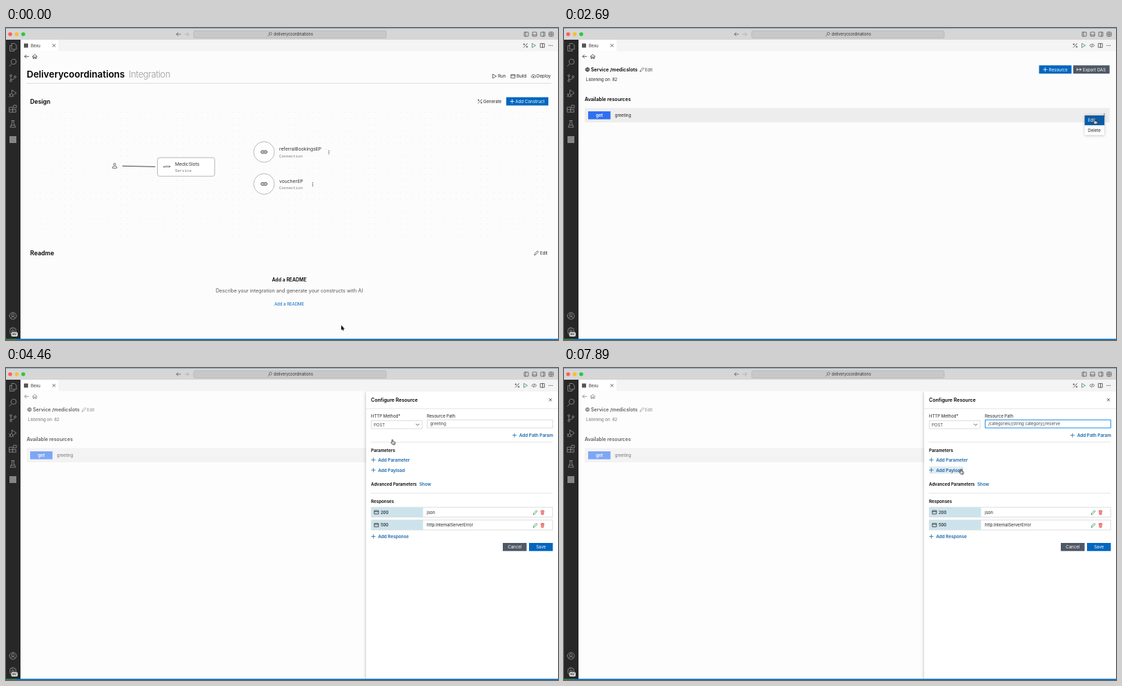
Animation, 800 px wide and 453 px high, one loop 7.99 s. Source, as an HTML page with a canvas:

```html
<!DOCTYPE html>
<html lang="en">
<head>
<meta charset="utf-8">
<title>Service editor</title>
<style>
  html, body { margin: 0; width: 100%; height: 100%; overflow: hidden; background: #fcfcfc; }
  canvas { display: block; width: 100vw; height: 100vh; }
</style>
</head>
<body>
<canvas id="stage"></canvas>
<script>
const W = 800, H = 453, LOOP = 7990, STEP = 650 / 7;
const BLUE = '#0066bf', INK = '#1e1e1e', GREY = '#616161';
const SANS = 'Inter, "Open Sans", sans-serif';
const MONO = '"Liberation Mono", "DejaVu Sans Mono", monospace';
const canvas = document.getElementById('stage');
const ctx = canvas.getContext('2d');
const dpr = window.devicePixelRatio || 1;
canvas.width = W * dpr;
canvas.height = H * dpr;

// y is the middle of the capital letters
function text(s, x, y, size = 6.1, color = INK, weight = 400, align = 'left', family = SANS) {
  ctx.font = `${weight} ${size}px ${family}`;
  ctx.fillStyle = color;
  ctx.textAlign = align;
  ctx.fillText(s, x, y + size * 0.365);
}
const bold = (s, x, y, size, color = '#000') => text(s, x, y, size, color, 600);

function box(x, y, w, h, fill, stroke, r = 0, lw = 0.7) {
  ctx.beginPath();
  ctx.roundRect(x, y, w, h, r);
  if (fill) { ctx.fillStyle = fill; ctx.fill(); }
  if (stroke) { ctx.strokeStyle = stroke; ctx.lineWidth = lw; ctx.stroke(); }
}
function circle(x, y, r, fill, stroke, lw = 0.8) {
  box(x - r, y - r, 2 * r, 2 * r, fill, stroke, r, lw);
}
function shadowBox(x, y, w, h, blur) {
  ctx.save();
  ctx.shadowColor = 'rgba(0,0,0,.28)';
  ctx.shadowBlur = blur * dpr;
  box(x, y, w, h, '#fff');
  ctx.restore();
}
// SVG path drawn around a centre
function icon(d, x, y, color = '#444', lw = 0.8, fill) {
  const p = new Path2D(d);
  ctx.save();
  ctx.translate(x, y);
  ctx.lineWidth = lw;
  ctx.lineJoin = ctx.lineCap = 'round';
  ctx.strokeStyle = color;
  if (fill) { ctx.fillStyle = fill; ctx.fill(p); }
  ctx.stroke(p);
  ctx.restore();
}
const rule = (x1, x2, y, color = '#dcdcdc') => icon(`M${x1} ${y}H${x2}`, 0, 0, color, 0.8);
function kebab(x, y, color = '#333') {
  for (const d of [-2.3, 0, 2.3]) circle(x, y + d, 0.65, color);
}

const ICON = {
  back: 'M3 0H-3M-.6 -2.4L-3 0L-.6 2.4',
  fwd: 'M-3 0H3M.6 -2.4L3 0L.6 2.4',
  home: 'M-3.3 .2L0 -3L3.3 .2M-2.4 -.5V3H-.8V.8H.8V3H2.4V-.5',
  plus: 'M-2.7 0H2.7M0 -2.7V2.7',
  close: 'M-1.8 -1.8L1.8 1.8M1.8 -1.8L-1.8 1.8',
  play: 'M-2.2 -2.8L2.6 0L-2.2 2.8Z',
  split: 'M-2.8 -2.8H2.8V2.8H-2.8ZM0 -2.8V2.8',
  code: 'M-1.5 -2L-3.3 0L-1.5 2M1.5 -2L3.3 0L1.5 2M.5 -2.4L-.5 2.4',
  wand: 'M-2.8 2.8L1.2 -1.2M-2.2 -2.6V-.8M-3.1 -1.7H-1.3M2 1V2.8M1.1 1.9H2.9M2.4 -2.9L1.2 -1.2',
  pencil: 'M-2.8 2.8L-2.2 .8L1.6 -3L3 -1.6L-.8 2.2Z',
  chevron: 'M-2.3 -1.1L0 1.2L2.3 -1.1',
  link: 'M-.7 -2H-2.4A2 2 0 0 0 -2.4 2H-.7M.7 -2H2.4A2 2 0 0 1 2.4 2H.7M-1.9 0H1.9',
  person: 'M-1.5 -2A1.5 1.5 0 1 0 1.5 -2A1.5 1.5 0 1 0 -1.5 -2M-3 3.3V2.3Q-3 .9 -1.5 .9H1.5Q3 .9 3 2.3V3.3Z',
  globe: 'M-2.8 0A2.8 2.8 0 1 0 2.8 0A2.8 2.8 0 1 0 -2.8 0M-2.6 -1H2.6M-2.6 1H2.6M0 -2.8Q-2.6 0 0 2.8Q2.6 0 0 -2.8',
  box: 'M-2.8 -2.4H2.8V2.6H-2.8ZM-2.8 -.8H2.8',
  cloud: 'M-1.8 2H-2A1.6 1.6 0 0 1 -1.9 -1A2 2 0 0 1 1.9 -1.2A1.6 1.6 0 0 1 2 2H1.6M0 2.6V0M-1 1L0 0L1 1',
  bin: 'M-2.4 -2H2.4M-.9 -2.9H.9M-1.8 -2L-1.5 2.9H1.5L1.8 -2M-.5 -.7V1.7M.5 -.7V1.7',
  export: 'M-3 -1.6V1.6M-2.6 0H3M1.2 -1.8L3 0L1.2 1.8',
  lens: 'M-1 1L-3 3M-1.2 -.8A2 2 0 1 0 2.8 -.8A2 2 0 1 0 -1.2 -.8',
  files: 'M-1.5 -5.5H2.6L5 -3V3H-1.5ZM-1.5 -2.5H-4.5V5.5H2V3',
  search: 'M-1.8 1.8L-5 5.2M-2.6 -1.4A3.7 3.7 0 1 0 4.8 -1.4A3.7 3.7 0 1 0 -2.6 -1.4',
  branch: 'M-3 -2V2.5M-4.3 -3.5A1.4 1.4 0 1 0 -1.5 -3.5A1.4 1.4 0 1 0 -4.3 -3.5M-4.3 4A1.4 1.4 0 1 0 -1.5 4A1.4 1.4 0 1 0 -4.3 4M1.8 -1.8A1.4 1.4 0 1 0 4.6 -1.8A1.4 1.4 0 1 0 1.8 -1.8M3.2 -.4Q3 2 -2.6 2.4',
  debug: 'M-1.5 -1V-5L5 -.5L.6 2.5M-4.2 2.6A2 2.4 0 1 0 -.2 2.6A2 2.4 0 1 0 -4.2 2.6M-5.4 1L-4 1.8M-5.4 4.6L-4 3.8M1 4.6L-.4 3.8',
  blocks: 'M-5 -2.2H-.4V5H-5ZM-5 1.4H4.4V5H-.4M1.2 -5H5V-1.2H1.2Z',
  flask: 'M-2 -5H2M-1.2 -5V-1.5L-4 4.6H4L1.2 -1.5V-5M-2.6 1.6H2.6',
  user: 'M-5 0A5 5 0 1 0 5 0A5 5 0 1 0 -5 0M-1.9 -1.3A1.9 1.9 0 1 0 1.9 -1.3A1.9 1.9 0 1 0 -1.9 -1.3M-3.4 3.6Q-2.8 1 0 1Q2.8 1 3.4 3.6',
  gear: 'M-1.6 0A1.6 1.6 0 1 0 1.6 0A1.6 1.6 0 1 0 -1.6 0M-1 -5H1L1.4 -3.5L3.2 -4.2L4.4 -2.8L3.6 -1L5 0L3.6 1.4L4 3.2L2.6 4.2L1 3.6L0 5L-1.4 3.6L-3.2 4.2L-4.4 2.8L-3.6 1L-5 0L-3.6 -1.2L-4.2 -3L-2.8 -4.2L-1.4 -3.5Z',
  arrow: 'M0 0V6.4L1.5 5.1L2.4 7.2L3.4 6.7L2.5 4.7H4.4Z',
  hand: 'M-.8 .4Q0 -.6 .7 .4V2.7L3.6 3.4Q4.3 3.6 4.2 4.5L3.6 7.2H.3L-2 4.4Q-2 3.5 -.8 4.1Z',
  beam: 'M-1.4 -3.8Q0 -3.8 0 -3V3Q0 3.8 -1.4 3.8M1.4 -3.8Q0 -3.8 0 -3M0 3Q0 3.8 1.4 3.8M-.8 .9H.8'
};

function chrome(isHome) {
  box(0, 0, W, H, '#fcfcfc');
  box(0, 0, W, 17, '#d6d6d6');
  box(0, 0, W, 1, '#86a9bd');
  ['#ff5f57', '#febc2e', '#28c840'].forEach((c, i) => circle(6 + i * 9.5, 9, 2.8, c));
  icon(ICON.back, 250, 9, '#555');
  icon(ICON.fwd, 262, 9, '#aaa');
  box(272, 4, 279, 10.5, '#c8c8c8', '#aeaeae', 2, 0.6);
  icon(ICON.lens, 382.5, 9, '#444', 0.6);
  text('deliverycoordinations', 388, 9.2, 5.6, '#333');
  [754, 766, 778, 790].forEach((x, i) => {
    box(x - 3, 6, 6, 6, null, '#444', 0.5);
    icon(['M-1 -3V3', 'M-3 1H3', 'M1 -3V3', 'M-3 0H3M0 -3V3'][i], x, 9, '#444', 0.7);
  });

  box(0, 17, 21, 435, '#272727');
  ['files', 'search', 'branch', 'debug', 'blocks', 'flask'].forEach((n, i) =>
    icon(ICON[n], 10, 28 + i * 22.3, '#8a8a8a', 0.9));
  box(5, 157, 10, 10, '#858585');
  icon(ICON.user, 10, 418, '#8a8a8a', 0.9);
  icon(ICON.gear, 10, 440, '#8a8a8a', 0.9);
  box(7.5, 441.5, 9.5, 6.5, '#d8d8d8', null, 2);
  text('NV', 12.2, 444.8, 4, '#222', 600, 'center');

  box(21, 17, 779, 16.5, '#f4f4f4');
  box(21, 17, 55, 16.5, '#fff');
  box(26, 22.5, 6, 6, '#555');
  text('Bexu', 36, 25.4, 5.9, '#333');
  icon(ICON.close, 69.5, 25.4, '#333', 0.8);
  const shift = isHome ? 12 : 0;
  icon(ICON.wand, 741 + shift, 25.4);
  icon(ICON.play, 753 + shift, 25.4, '#388a54');
  if (!isHome) icon(ICON.code, 765.3, 25.4);
  icon(ICON.split, 777.5, 25.4);
  for (const x of [787, 789.3, 791.6]) circle(x, 25.4, 0.6, '#444');

  icon(ICON.back, 30, 41.3, '#333');
  icon(ICON.home, 41.7, 41.3, '#333');
}

function statusBar() {
  box(0, 451.3, W, 1.7, '#1172b9');
  box(0, 451.3, 15, 1.7, '#3c7a45');
}

function connection(name, y, dotsX) {
  circle(374, y, 15, '#fff', '#a8a8a8');
  icon(ICON.link, 374, y, '#333', 1);
  text(name, 396, y - 4, 6.75, '#333');
  text('Connection', 396, y + 5.7, 5.7, '#777', 400, 'left', MONO);
  kebab(dotsX, y + 0.5);
}

function homePage(hover) {
  bold('Deliverycoordinations', 30, 67.2, 13.4);
  ctx.letterSpacing = '-0.4px';
  text('Integration', 178, 67.2, 13, '#9a9a9a', 300);
  ctx.letterSpacing = '0px';
  icon(ICON.play, 708, 70);
  text('Run', 713, 70.2);
  icon(ICON.box, 735, 70);
  text('Build', 740, 70.2);
  icon(ICON.cloud, 764.3, 70);
  text('Deploy', 769, 70.2);
  rule(30, 790, 80.3, '#d4d4d4');

  bold('Design', 35, 107.3, 8.7);
  icon(ICON.wand, 687, 106.5);
  text('Generate', 691.7, 106.6);
  box(725, 100.5, 61, 12, BLUE);
  icon(ICON.plus, 733.5, 106.5, '#fff');
  text('Add Construct', 738.3, 106.6, 6.2, '#fff');
  ctx.fillStyle = '#e6e6e6';
  for (let x = 40; x < 788; x += 9)
    for (let y = 122; y < 303; y += 9) ctx.fillRect(x, y, 0.9, 0.9);

  icon(ICON.person, 157.5, 199.8, '#555');
  icon('M169 200.4L216 201.4', 0, 0, '#444', 1);
  box(219.5, 188.2, 83, 27, '#fff', hover ? BLUE : '#a8a8a8', 3, 0.8);
  bold('HTTP', 228, 201.6, 3.9, '#333');
  text('MedicSlots', 245, 197.5, 6.75, '#333');
  text('Service', 245, 207, 5.7, '#777', 400, 'left', MONO);
  connection('referralBookingsEP', 180, 468);
  connection('voucherEP', 226.4, 444.5);

  bold('Readme', 35, 326.8, 8.8);
  icon(ICON.pencil, 768.7, 326.6);
  text('Edit', 774, 326.8);
  text('Add a README', 410.5, 365.7, 6.9, '#000', 600, 'center');
  text('Describe your integration and generate your constructs with AI', 410.5, 381.6, 7.2, '#555', 400, 'center');
  text('Add a README', 410.5, 401, 6, BLUE, 400, 'center');
}

function servicePage(rowHover) {
  icon(ICON.globe, 34, 60.4, '#222', 0.7);
  bold('Service /medicslots', 39, 60.4, 7.05);
  icon(ICON.pencil, 113, 60.4, GREY);
  text('Edit', 117.3, 60.4, 6.1, '#444');
  text('Listening on: 82', 32, 74.8, 6);
  box(688.5, 54.3, 47, 12, BLUE);
  icon(ICON.plus, 697.3, 60.3, '#fff');
  text('Resource', 702.8, 60.4, 6.1, '#fff');
  box(738, 54.3, 52.7, 12, '#4f5865');
  icon(ICON.export, 746.5, 60.3, '#fff');
  text('Export OAS', 752, 60.4, 6.1, '#fff');

  bold('Available resources', 30, 103, 7.05);
  box(30, 116.3, 760.8, 20.7, rowHover ? '#e0e0e0' : '#ededed');
  box(35, 121, 32.4, 11.5, '#2f70f2');
  text('get', 51.2, 126.8, 6.4, '#fff', 600, 'center');
  text('greeting', 73.7, 126.7, 6);
  kebab(783, 126.7);
}

function menu(cy) {
  shadowBox(754.5, 127, 28.7, 28.5, 4);
  ['Edit', 'Delete'].forEach((s, i) => {
    const y = 127 + i * 14.2, on = cy >= y && cy < y + 14.2;
    if (on) box(754.5, y, 28.7, 14.2, '#0a5ca5');
    text(s, 759.3, y + 7.2, 6.1, on ? '#fff' : INK);
  });
}

function action(s, x, y) {
  icon(ICON.plus, x + 3.2, y, '#1565a8');
  bold(s, x + 10, y, 6.4, '#1565a8');
}

function response(code, type, y) {
  box(529.4, y, 262.8, 14.3, '#fff', '#cfcfcf');
  box(529.4, y, 75, 14.3, '#cde3ec');
  icon(ICON.box, 537, y + 7.2, '#333');
  bold(code, 543, y + 7.3, 5.8, '#333');
  text(type, 610, y + 7.3, 6);
  icon(ICON.pencil, 767, y + 7.6, '#2f8a4c');
  icon(ICON.bin, 777.5, y + 7.6, '#e0352b');
}

function panel(t, c) {
  const post = t >= 4450, focused = t >= 5190, pasted = t >= 5650;
  const open = t >= 3890 && !post;
  const dy = post ? 15 : 0;
  box(21, 33.5, 501, 418, 'rgba(252,252,252,.38)');
  ctx.save();
  ctx.beginPath();
  ctx.rect(510, 33.5, 290, 418);
  ctx.clip();
  shadowBox(522, 33.5, 290, 430, 5);
  ctx.restore();

  bold('Configure Resource', 529, 46.2, 7.05);
  icon(ICON.close, 789, 46.2, '#333', 0.8);
  rule(522, 800, 59);
  text('HTTP Method*', 529, 70.3, 6);
  text('Resource Path', 610, 70.3, 6);
  box(529.4, 76.5, 73.8, 11.6, '#fff', open ? '#0a84d6' : '#cecece');
  text(post ? 'POST' : 'GET', 533, 82.4, 6.05, '#444');
  icon(ICON.chevron, 596.5, 82.3, '#444');
  box(610.4, 75.3, 182, 11.7, '#fff', focused ? '#1b8ce3' : '#cecece', 0, focused ? 1 : 0.7);
  if (focused && !pasted) box(614.5, 77.3, 24, 8, '#a9cdf3');
  text(pasted ? '/categories/[string category]/reserve' : 'greeting', 614.7, 81.3, 5.95, '#444');
  action('Add Path Param', 733.7, 97.7);
  rule(529, 792, 107.7);

  bold('Parameters', 529, 119.8, 6.3);
  action('Add Parameter', 529.2, 133.4);
  if (post) {
    if (t >= 7320) box(529.2, 143, 49.5, 10.4, '#e2ebf1');
    action('Add Payload', 529.2, 148.2);
  }
  bold('Advanced Parameters', 529, 154.1 + dy, 6.2);
  bold('Show', 599, 153.8 + dy, 6.3, '#1565a8');
  rule(529, 792, 166.8 + dy);
  bold('Responses', 529, 179 + dy, 6.25);
  response('200', 'json', 187.2 + dy);
  response('500', 'http:InternalServerError', 205.8 + dy);
  action('Add Response', 529.2, 229.6 + dy);
  box(720, 239 + dy, 34.5, 11.7, '#4f5865');
  text('Cancel', 737.2, 244.8 + dy, 6.1, '#fff', 400, 'center');
  box(758, 239 + dy, 34.5, 11.7, BLUE);
  text('Save', 775.2, 244.8 + dy, 6.1, '#fff', 400, 'center');

  if (open) {
    shadowBox(529.4, 88.3, 73.8, 55, 3);
    ['GET', 'POST', 'PUT', 'DELETE', 'PATCH'].forEach((s, i) => {
      const y = 88.3 + i * 11, on = c.y < 88.3 ? !i : c.y >= y && c.y < y + 11;
      if (on) box(529.4, y, 73.8, 11, '#0a5ca5');
      text(s, 533, y + 5.6, 6.05, on ? '#fff' : '#444');
    });
  }
}

// time, x, y of the pointer tip
const path = [
  [0, 486, 432], [60, 486, 432], [370, 390, 312], [470, 390, 312], [740, 262, 203],
  [930, 262, 203], [1500, 780.3, 130], [1860, 780.3, 130], [2500, 769, 132.5],
  [2790, 769, 132.5], [3530, 588, 82], [3900, 588, 82], [4270, 560, 104],
  [4460, 560, 104], [5110, 634.3, 83], [5850, 634.3, 83], [6500, 633, 136],
  [6960, 633, 136], [7340, 575, 147], [LOOP, 575, 147]
];
const shapes = [[0, 'arrow'], [640, 'hand'], [1000, 'arrow'], [1390, 'hand'], [2870, 'arrow'],
  [3430, 'hand'], [4720, 'arrow'], [5000, 'beam'], [6030, 'arrow'], [7320, 'hand']];

function cursorAt(t) {
  const i = Math.max(1, path.findIndex(p => p[0] >= t));
  const [t0, x0, y0] = path[i - 1], [t1, x1, y1] = path[i];
  const u = (t - t0) / (t1 - t0), e = u * u * (3 - 2 * u);
  return { x: x0 + (x1 - x0) * e, y: y0 + (y1 - y0) * e, shape: shapes.findLast(s => s[0] <= t)[1] };
}

function drawCursor({ x, y, shape }) {
  if (shape === 'beam') {
    icon(ICON.beam, x, y, '#fff', 1.6);
    icon(ICON.beam, x, y, '#111', 0.8);
  } else if (shape === 'hand') {
    icon(ICON.hand, x, y, '#222', 0.8, '#fff');
    icon('M1.2 4.8V6M2.5 4.8V6', x, y, '#222', 0.5);
  } else {
    icon(ICON.arrow, x, y, '#fff', 1.2);
    icon(ICON.arrow, x, y, '#000', 0.3, '#000');
  }
}

function draw(t) {
  const c = cursorAt(t), isHome = t < 920;
  ctx.setTransform(dpr, 0, 0, dpr, 0, 0);
  chrome(isHome);
  if (isHome) homePage(t >= 640);
  else servicePage(t >= 1290 && t < 1850);
  if (t >= 1850 && t < 2870) menu(c.y);
  if (t >= 2870) panel(t, c);
  statusBar();
  drawCursor(c);
}

let last = -1;
function tick(now) {
  const step = Math.floor((now % LOOP + 6) / STEP);
  if (step !== last) draw(Math.min(step * STEP, LOOP));
  last = step;
  requestAnimationFrame(tick);
}
draw(0);
requestAnimationFrame(tick);
</script>
</body>
</html>
```
